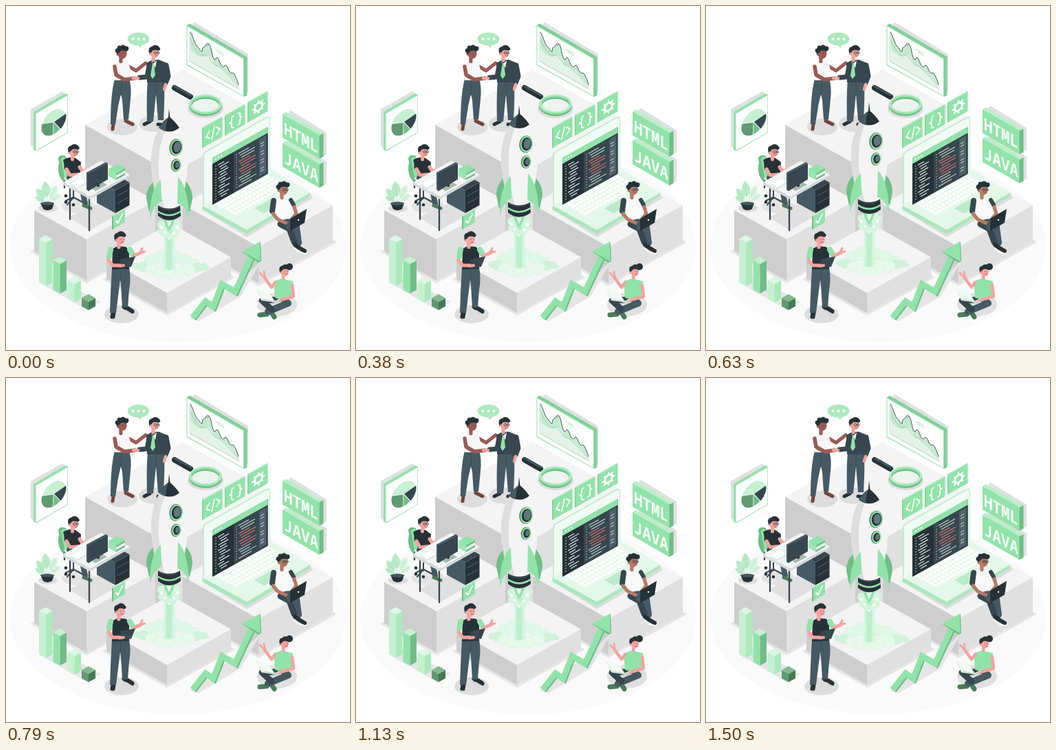
An HTML page with a canvas that plays this animation: 500 px wide and 500 px high, repeating every 1540 ms.

```html
<!DOCTYPE html>
<html lang="en">
<head>
<meta charset="utf-8">
<title>Rocket launch team</title>
<style>
html, body { margin: 0; width: 100%; height: 100%; overflow: hidden; background: #fff; }
canvas { display: block; width: 500px; height: 500px; }
</style>
</head>
<body>
<canvas id="stage" width="500" height="500"></canvas>
<script>
const ctx = document.getElementById('stage').getContext('2d');
const LOOP = 1540, STEP = LOOP / 37;
const GREEN = '#92e3a9', PALE = '#c5f1d1', MINT = '#e4f8ea', DEEP = '#70bd87';
const INK = '#263238', SLATE = '#37474f', DENIM = '#455a64';
const SKIN = '#f5a39b', BROWN = '#9b5a52', TAN = '#b97964';

function fill(color, path) {
  ctx.fillStyle = color;
  ctx.fill(new Path2D(path));
}
function line(color, width, path, cap = 'round', join = 'round') {
  ctx.strokeStyle = color;
  ctx.lineWidth = width;
  ctx.lineCap = cap;
  ctx.lineJoin = join;
  ctx.stroke(new Path2D(path));
}
function oval(color, x, y, rx, ry = rx, turn = 0) {
  ctx.fillStyle = color;
  ctx.beginPath();
  ctx.ellipse(x, y, rx, ry, turn, 0, Math.PI * 2);
  ctx.fill();
}
function ring(color, width, x, y, rx, ry = rx, turn = 0) {
  ctx.strokeStyle = color;
  ctx.lineWidth = width;
  ctx.beginPath();
  ctx.ellipse(x, y, rx, ry, turn, 0, Math.PI * 2);
  ctx.stroke();
}
function rect(color, x, y, w, h) {
  ctx.fillStyle = color;
  ctx.fillRect(x, y, w, h);
}
// Draws in a sheared space whose axes are (a, b) and (c, d).
function plane([a, b, c, d], x, y, draw) {
  ctx.save();
  ctx.transform(a, b, c, d, x, y);
  draw();
  ctx.restore();
}
const shift = (x, y, draw) => plane([1, 0, 0, 1], x, y, draw);
const RISING = [1, -.56, 0, 1], FALLING = [1, .577, 0, 1], GROUND = [1, -.555, 1, .555];

// Isometric box given by its front top corner.
function box(x, y, l, r, h, [top, left, right], k = .56) {
  fill(left, `M${x} ${y}l${-l} ${-l * k}v${h}l${l} ${l * k}z`);
  fill(right, `M${x} ${y}l${r} ${-r * k}v${h}l${-r} ${r * k}z`);
  fill(top, `M${x} ${y}l${-l} ${-l * k}l${r} ${-r * k}l${l} ${l * k}z`);
}
function block(x, y, l, r, h) {
  fill('#e6e6e6', `M${x} ${y + h + 4}l${-l - 6} ${-(l + 6) * .56}l${r + 6} ${-(r + 6) * .56}l${l + 6} ${(l + 6) * .56}z`);
  box(x, y, l, r, h, ['#f4f4f4', '#cecece', '#e0e0e0']);
}

function pieSign() {
  fill('#e0e0e0', 'M36 150L82 124L86 128V180L40 207L36 204Z');
  fill(GREEN, 'M40 154L86 127L90 129V184L44 211L40 209Z');
  fill('#fff', 'M43.500 156.500L89.300 130V183.500L43.500 210Z');
  plane([1, -.5, 0, 1], 69, 169, () => {
    const slice = (color, from, to, x = 0, y = 0) => {
      ctx.fillStyle = color;
      ctx.beginPath();
      ctx.moveTo(x, y);
      ctx.arc(x, y, 17.5, from, to);
      ctx.fill();
    };
    slice(PALE, -2.8, .05);
    slice(SLATE, -.2, 1, 1, 0);
    slice(DEEP, 1, 1.65);
    slice('#609a70', 1.65, 3.48);
    line('#fff', .6, 'M0 0L-16 -6M0 0L0 17');
  });
}
function chartSign() {
  fill('#e0e0e0', 'M271 26L275 24L352 70V124L346 128Z');
  fill('#7fd096', 'M263 28L267 25.5L350.5 74V130L346 132Z');
  fill(GREEN, 'M262.500 28L346 76V132L262.500 86Z');
  fill('#fff', 'M263.500 29.500L345 77V130.500L263.500 85Z');
  const curve = 'M268 38C272 43 274 55 278 59C281 60 282 67 285 66C286 56 288 62 290 57Q295 50 298 62Q301 79 304 78Q307 71 310 80Q314 91 317 88Q320 82 324 94Q327 99 330 97Q334 101 338 114';
  fill('#c4ead0', curve + 'V120L268 80Z');
  fill('#e2f4e8', 'M268 62Q277 74 287 74Q296 65 303 86Q316 88 338 116V121L268 82Z');
  line('#8fae9d', .6, 'M268 49Q276 67 284 72Q290 69 295 75Q302 87 310 88Q324 101 338 117');
  line(SLATE, .9, curve);
  line('#a0aaa5', .5, 'M267 37V80L339 121');
  line(GREEN, .9, 'M305 63L316 69M308 67L316 72');
  oval('#fff', 293, 55.5, 1.7);
  ring(SLATE, .7, 293, 55.5, 1.5);
}
function bubble() {
  oval('#ade9bd', 192.5, 48, 15.8, 9.4);
  fill('#ade9bd', 'M189 54H199L195 61Z');
  for (const x of [184.500, 192.500, 200.500]) oval('#fff', x, 48, 1.9);
}
function magnifier() {
  oval('#dcdcdc', 290, 149, 26, 14);
  line('#a7bfae', 4, 'M267 132L272 135');
  line(INK, 8, 'M245 119L268 132');
  line(DENIM, 2.4, 'M245 117L269 130');
  oval('#edf3ef', 290, 143, 23, 13);
  ring(DEEP, 4, 290, 145.5, 22, 12.5);
  ring(GREEN, 4, 290, 143, 22, 12.5);
  ring(PALE, 1.6, 290, 141.5, 22.5, 12.5);
}

function tile(x, y, draw) {
  plane(RISING, x, y, () => {
    rect('#7fd096', -1, 0, 3, 30);
    rect(GREEN, .5, 1, 28, 29);
    rect('#bceec9', -1, 0, 29, 1.5);
    draw();
  });
}
function tiles() {
  tile(286, 176, () => line('#fff', 1.7, 'M10 11L5 17L10 22M20 11L25 17L20 22M17 9L13 25'));
  tile(319, 158, () => line('#fff', 1.8, 'M12 8Q8 8 9 13Q9 16 6 16Q9 16 9 20Q8 25 12 25M18 8Q22 8 21 13Q21 16 24 16Q21 16 21 20Q22 25 18 25'));
  tile(352, 139, () => {
    ring('#fff', 3, 15, 16, 5.5);
    for (let i = 0; i < 8; i++) {
      const a = i * Math.PI / 4, c = Math.cos(a), s = Math.sin(a);
      line('#fff', 2.3, `M${15 + 7 * c} ${16 + 7 * s}L${15 + 8.5 * c} ${16 + 8.5 * s}`);
    }
  });
}

function laptop() {
  fill('#ddd', 'M284 295L350 336L446 279L441 270Z');
  fill('#a6e9b9', 'M285.500 290L350 326L442 272V276L350 331.500L285.500 296Z');
  fill('#bdeeca', 'M286 217Q286 213 290 211L379 161Q384 159 384 165V237L290 291L286 289Z');
  fill('#f0fbf3', 'M288 218Q288 214 291 212.500L379 163Q383 161 383 167V236L288 290Z');
  fill(MINT, 'M286 290L384 236L442 271L350 325Z');
  plane(GROUND, 286, 290, () => {
    rect('#f8fdf9', 11, 7, 77, 31);
    for (let row = 0; row < 5; row++)
      for (let col = 0; col < 14; col++) {
        rect('#d8f3e0', 12 + col * 5.4, 8 + row * 6, 4.800, 5.3);
        rect('#fff', 12 + col * 5.4, 8 + row * 6, 4.2, 4.4);
      }
    rect('#bcebca', 34, 41, 28, 14);
  });
  plane(RISING, 300, 221, () => {
    rect(INK, 0, 0, 80.500, 68);
    rect(SLATE, 31, 9, 49.500, 58);
    rect(GREEN, 0, -.5, 80.500, 9);
    for (const x of [5, 9, 13]) oval('#fff', x, 4, 1.1);
    rect('#4f626b', 68, 11, 10, 54);
    for (let i = 0; i < 13; i++) {
      const y = 14 + i * 4;
      rect('#e6f2ea', 8 + i * 7 % 5, y, 9 + i * 5 % 10, 1.3);
      rect(GREEN, 4, y, 2, 1);
      const red = i > 2 && i < 9;
      rect(red ? '#e57373' : '#cbdad1', 38 + i % 3 * 2, y, 15 + i * 7 % 10, 1.2);
      rect(red ? '#cf8580' : '#9eb5a8', 34, y, 2, 1);
      if (i % 3) rect('#bdccc4', 70, y, 5, 1.2);
    }
  });
}

function board(y, label) {
  shift(402, y, () => {
    fill('#e0e0e0', 'M9 -3L12 -5L64 27V59L55 63L9 31Z');
    fill('#bceec9', 'M0 0L5 -3L59.500 29L53.500 32Z');
    fill(DEEP, 'M53 31.500L59.500 28V62L53 65.500Z');
    plane(FALLING, 0, 0, () => rect(GREEN, 0, 0, 53.500, 34.500));
    plane([.866, .5, 0, 1], 2, 29, () => {
      ctx.fillStyle = '#f4fcf6';
      ctx.font = '800 24px "Noto Sans Mono", monospace';
      ctx.fillText(label, 0, 0);
    });
  });
}

function desk() {
  oval('#e3e3e3', 105, 291, 24, 10);
  fill('#e0e0e0', 'M91 307L122 326L180 293L155 278Z');
  line(DEEP, 4, 'M79 228Q75 246 87 256L103 258');
  fill(DEEP, 'M76 222Q77 215 87 218L92 246L82 251Z');
  fill(GREEN, 'M80 222Q83 217 88 221L94 249L85 250Z');
  line(SLATE, 2, 'M98 260V280M87 283L98 278L111 285M98 278L89 289');
  for (const [x, y] of [[87, 285], [98, 289], [87, 276]]) oval(INK, x, y, 2.3);
  line(DENIM, 8, 'M92 250L110 263L115 287');
  line('#477d58', 5, 'M113 290L123 294');
  fill(INK, 'M83 224Q91 218 101 221L109 227L108 246L91 250Z');
  line(INK, 7, 'M88 227L88 235');
  line(SKIN, 5, 'M88 237L93 246L114 244M107 234L111 240L121 238');
  head(98.500, 212, SKIN, 1, true);
  line(SLATE, 2.3, 'M93 262V310M121 277V326M85 255V264');
  box(159, 268, 27, 20.5, 33, [SLATE, DENIM, INK]);
  line('#718087', .7, 'M162 276L178 267M162 287L178 278');
  fill('#d5dadd', 'M83 256L122 277L180 245V248L122 281L83 260Z');
  fill('#f1f5f2', 'M83 256L138 225L180 245L122 277Z');
  fill('#dce4df', 'M94 260L110 252L119 257L103 266Z');
  fill('#fff', 'M95 258L109 251L117 256L103 264Z');
  fill('#a8b8af', 'M123 264L140 256L147 260L130 269Z');
  line(INK, 4, 'M134 254V261');
  fill(DENIM, 'M117 242L145 227L148 229V251L120 269L117 267Z');
  fill(SLATE, 'M119 244L148 229V252L119 269Z');
  for (let i = 0; i < 3; i++) box(160, 250 - i * 3.5, 11, 13, 3, [i == 2 ? GREEN : PALE, GREEN, i % 2 ? '#edf5ef' : DEEP]);
}
function plant() {
  oval('#ddd', 61, 294, 14, 6);
  const leaf = (turn, size, color) => {
    ctx.save();
    ctx.translate(60, 286);
    ctx.rotate(turn);
    fill(color, `M0 ${-size * .25}Q${size * .38} ${-size * .6} 0 ${-size}Q${-size * .38} ${-size * .6} 0 ${-size * .25}`);
    line('#9fd6af', .5, `M0 0V${-size * .85}`);
    ctx.restore();
  };
  [-1.1, 1, -.65, .5, -.1].forEach((a, i) => leaf(a, 20 + i * 3, i % 2 ? '#d6f3de' : '#b9ebc7'));
  fill(INK, 'M50 286Q60 291 70 286L67 295Q60 299 54 295Z');
  oval(DENIM, 60, 287, 10, 2.6);
}

function head(x, y, skin, scale = 1, glasses = false, curly = false) {
  plane([scale, 0, 0, scale], x, y, () => {
    line(skin, 5, 'M-2 5L-2 11');
    oval(skin, 0, 0, 6.2, 7.5);
    fill(INK, 'M-7 3Q-11 -8 -4 -9Q2 -14 7 -8Q10 -5 6 -3Q0 -5 -3 -3Z');
    if (curly) for (const [cx, cy] of [[-7, -4], [-4, -8], [1, -9], [6, -7]]) oval(INK, cx, cy, 3);
    oval(skin, -5.5, 1.5, 1.6, 2);
    oval(INK, 1, 0, .6);
    oval(INK, 5, 0, .6);
    line('#a44d47', .7, 'M1 4Q3 5 5 4');
    if (glasses) {
      ring(SLATE, .7, 1, 0, 2);
      ring(SLATE, .7, 5.3, 0, 1.8);
    }
  });
}
function handshake() {
  oval('#ddd', 169, 176, 22, 12);
  oval('#ddd', 215, 171, 22, 12);
  line('#74433d', 5, 'M156 172L155 179M174 167L184 172');
  fill(DENIM, 'M158 106H179Q183 118 181 135L178 165H171L169 137L167 128L163 146L159 172H152Q152 128 158 106Z');
  line(SLATE, .8, 'M168 112L167 130');
  line(BROWN, 5, 'M177 87L189 94L203 83');
  fill('#f7f7f7', 'M160 84L166 79L178 81L181 93L179 108L158 108L160 96Z');
  line(BROWN, 5.5, 'M158 88L160 100L172 107L187 105');
  head(169, 69, BROWN, 1.04, false, true);
  line(INK, 5, 'M201 172L209 168M221 172L230 173');
  fill(DENIM, 'M206 108H230Q231 130 229 166H221L218 128L214 168H205Q204 130 206 108Z');
  line(SLATE, .8, 'M218 113L218 130');
  fill(SLATE, 'M204 83L211 79L222 78L234 83L232 111L205 111Z');
  line(SLATE, 7, 'M208 87L205 103L194 104M233 86L236 102L232 112');
  line(SKIN, 4.5, 'M192 105L185 105M232 114L230 121');
  fill('#f3f3f3', 'M210 79L214 84L219 79L217 90Z');
  fill(GREEN, 'M213 83L215 83L217 101L213 106L210 101Z');
  head(216, 68, SKIN, 1, true);
}
function standingMan() {
  oval('#ddd', 168, 448, 25, 13);
  line(INK, 7, 'M156 446L155 452M172 437L183 444');
  line('#fff', 1, 'M151 455L157 455M174 442L184 448');
  fill(DENIM, 'M154 380H179Q182 396 179 412L177 438H169L167 405L166 396L164 414L160 446H151Q152 412 154 380Z');
  line(SLATE, .8, 'M167 386L166 400');
  fill(INK, 'M155 353L162 349L174 350L179 354L179 382L154 383Z');
  line(GREEN, 8, 'M152 354L150 364M180 354L184 361');
  line(SKIN, 5, 'M149 369L155 377L167 377M186 363L197 358');
  line(SKIN, 3, 'M195 358L198 352M197 357L202 357');
  fill(SLATE, 'M166 368L188 364L182 379L168 381Z');
  line(SKIN, 4, 'M165 378L171 377');
  head(166, 339, SKIN, 1.04);
}
function seatedMan() {
  line(DENIM, 10, 'M403 314L421 315L425 344');
  line(SLATE, 9, 'M399 317L412 324L419 343');
  line(INK, 6, 'M420 347L427 352L434 356');
  line('#fff', 1.6, 'M419 352L426 358L436 360');
  fill('#f8f8f8', 'M391 281L402 277L414 281L418 307L394 313L392 298Z');
  line(SLATE, 8, 'M389 283L387 298');
  line(SLATE, 6, 'M414 282L418 289');
  line(TAN, 5, 'M388 302L395 310L410 317M419 292L422 302L416 309');
  head(403, 267, TAN, 1.05, true, true);
  fill(INK, 'M413 309L437 295L434 315L413 327Z');
  fill(DENIM, 'M407 318L413 310V327L407 323Z');
  oval('#fff', 425, 311, 1.2);
}
function seatedWoman() {
  oval('#e0e0e0', 394, 434, 29, 17);
  line('#477d58', 7, 'M369 449L379 448M386 446L390 452');
  line(DENIM, 10, 'M404 427L410 432L381 444');
  line(SLATE, 9, 'M393 427L372 428L386 441');
  fill(GREEN, 'M389 400L401 396L417 400L419 420L403 428L391 424Z');
  line(SKIN, 4.5, 'M391 402L386 409L376 395M416 406L418 422L397 428');
  line(SKIN, 2.5, 'M376 395L369 388M376 393L375 386');
  head(405, 386, SKIN, .93);
  oval(INK, 412, 379, 5);
  fill('#d9e8de', 'M364 412L384 419L392 431L371 428Z');
  fill('#effaf2', 'M364 411L383 417L389 429L371 425Z');
  fill('#c9d7ce', 'M371 425L389 429L399 425L394 433Z');
}

function bars() {
  fill('#e6e6e6', 'M48 402L118 442L137 430L70 393Z');
  box(58, 344, 10, 9.500, 63, ['#dcf7e3', '#c5f1d1', '#ace9bd']);
  box(78.500, 375, 10, 9.500, 43, [PALE, GREEN, DEEP]);
  box(99.500, 404, 10, 9.500, 27, ['#dcf7e3', '#c5f1d1', '#ace9bd']);
  box(120, 430, 10, 10, 12, ['#81b991', '#609a70', '#467953']);
}
function arrow() {
  fill('#e5e5e5', 'M268 454L280 458L341 422L373 368L338 402L305 424Z');
  const zigzag = 'M271 453L290 429L301 437L314 404L333 415L360 357';
  shift(2, 1.5, () => line(DEEP, 8, zigzag, 'butt', 'miter'));
  line(GREEN, 8.5, zigzag, 'butt', 'miter');
  fill(DEEP, 'M344 358L370 343L371 371L367 373Z');
  fill(GREEN, 'M343 357L369 342.500L369.500 371Z');
}
function checkTile() {
  plane(RISING, 154, 305, () => {
    rect(DEEP, 0, 0, 3, 20);
    rect(GREEN, 2, 0, 17, 20);
    rect(PALE, 0, 0, 19, 1.2);
    line('#fff', 2, 'M6 11L9 15L15 6');
  });
}

function cloud(rise, pinch) {
  const puff = (x, y, r, color) => {
    const inward = 9 * pinch * Math.max(0, (240 - x) / 56);
    oval(color, x + inward, y - 5 * rise, r, r * .9);
    ring('#cdf1d7', .5, x + inward, y - 5 * rise, r, r * .9);
  };
  for (const [x, y, r] of [[211, 370, 10], [225, 365, 11], [245, 365, 11], [261, 369, 10], [275, 374, 7]]) puff(x, y, r, '#e0f8e7');
  for (const [x, y, r] of [[189, 378, 5], [199, 379, 8], [277, 380, 8], [287, 379, 6], [292, 381, 3]]) puff(x, y, r, '#d0f3da');
  for (const [x, y, r] of [[211, 383, 9], [265, 383, 10], [224, 387, 9], [251, 387, 9], [238, 388, 9]]) puff(x, y, r, '#e6f9eb');
}
function exhaust(lift, rise) {
  const top = 312 - lift, base = 382 - 5 * rise;
  fill('#d5f5de', `M226 ${top}L230 ${top + 24}L229 ${base}Q237 ${base + 6} 246 ${base}L245 ${top + 24}L250 ${top}Z`);
  fill('#bcefca', `M233 ${top + 12}L233 ${base}Q237 ${base + 3} 241 ${base}L242 ${top + 12}Z`);
  shift(0, 1 - lift, () => {
    for (const [x, y, r] of [[226, 317, 6], [249, 317, 6], [226, 327, 5], [248, 327, 5], [233, 332, 5], [243, 333, 5]])
      oval('#d5f5de', x, y, r);
    for (const [x, y, r] of [[226, 321, 2.4], [249, 321, 2.5], [231, 328, 2], [244, 329, 2.2], [237, 337, 1.8]])
      oval('#f4fcf6', x, y, r);
    fill(GREEN, 'M229 307Q230 319 237 326Q244 319 245 307Z');
    fill('#eafaee', 'M233 308Q234 316 237 320Q240 316 241 308Z');
  });
}
function rocket() {
  fill(DEEP, 'M218 252Q204 261 204 279L208 298L221 282ZM257 250Q271 261 271 279L267 298L256 282Z');
  fill('#f4f4f4', 'M223 177C212 195 208 222 213 248C215 266 219 281 222 292Q237 299 252 292C259 272 264 248 264 225C263 205 258 188 251 177Z');
  fill('#dedede', 'M223 177C212 195 208 222 213 248C215 266 219 281 222 292L231 295C222 258 216 215 231 181Z');
  fill(GREEN, 'M225 251Q208 268 209 309Q214 288 226 283ZM250 247Q266 266 266 308Q261 289 249 286Z');
  fill(INK, 'M236 161L237 148L238.500 161Q246 167 252 176Q238 187 222 176Q228 166 236 161Z');
  fill(DENIM, 'M236 161Q228 167 222 176Q227 180 232 181Q232 171 236 161Z');
  for (const [y, rx, ry] of [[204.5, 9.800, 12.5], [230.5, 7.300, 9.500]]) {
    oval('#568c66', 247, y, rx, ry, .15);
    oval(GREEN, 248, y, rx - .8, ry - .6, .15);
    oval(INK, 248, y, rx - 2.6, ry - 3, .15);
    oval('#62757d', 249, y - .5, rx - 4.5, ry - 5, .15);
  }
  fill(INK, 'M221 289Q237 298 253 289L254 304Q237 317 221 304Z');
  line(GREEN, 2.6, 'M221.500 298Q237 308 253 298');
  line('#50636c', .8, 'M222 291Q237 300 252 291');
}

function draw(t) {
  const turn = t / LOOP * 2 * Math.PI;
  const rise = (1 - Math.cos(turn)) / 2;
  const pinch = Math.abs(Math.sin(turn));
  rect('#fff', 0, 0, 500, 500);
  oval('#fafafa', 250, 349, 244, 140);
  pieSign();
  chartSign();
  block(241, 243, 126, 142, 145);
  bubble();
  magnifier();
  handshake();
  block(367, 350, 110, 108, 53);
  block(117, 339, 76, 100, 60);
  block(234, 417, 88, 93, 29);
  laptop();
  tiles();
  shift(0, 1 - 7.5 * rise, () => {
    board(198, 'JAVA');
    board(156, 'HTML');
  });
  plant();
  desk();
  cloud(rise, pinch);
  exhaust(10 * rise, rise);
  shift(0, 1 - 10 * rise, rocket);
  checkTile();
  bars();
  arrow();
  standingMan();
  seatedMan();
  seatedWoman();
}

let start;
function tick(now) {
  start ??= now;
  const t = (now - start) % LOOP;
  draw(Math.floor(t / STEP) * STEP);
  requestAnimationFrame(tick);
}
requestAnimationFrame(tick);
</script>
</body>
</html>
```
